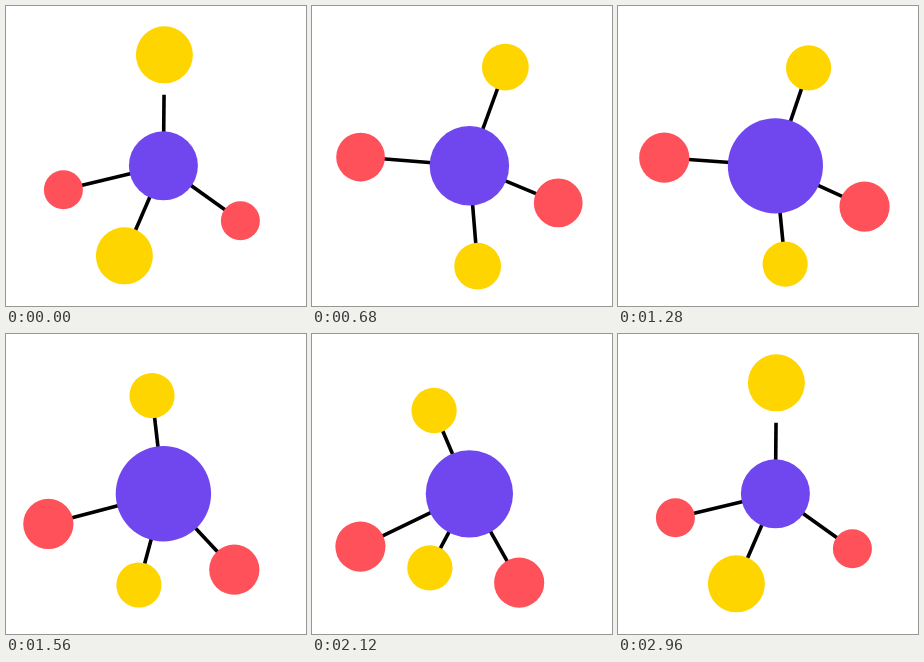
Animation, 300 px wide and 300 px high, one loop 3 s. Source, as an HTML page with a canvas:

```html
<!DOCTYPE html>
<html lang="en">
<head>
<meta charset="utf-8">
<title>Molecule</title>
<style>
  html, body { margin: 0; width: 100%; height: 100%; overflow: hidden; background: #fff; }
  canvas { display: block; }
</style>
</head>
<body>
<canvas width="300" height="300"></canvas>
<script>
const ctx = document.querySelector('canvas').getContext('2d');
const LOOP = 3000, STEP = 40, PHASE = 1000, PEAK = 1470;
const yellow = { color: '#ffd500', rest: 28.5, active: 22.6 };
const red = { color: '#ff5159', rest: 19.5, active: 25.1 };

// Atoms visit three stops around the core; bow bends the way between them outwards.
const atoms = [
  { ...yellow, bow: 1.7, gap: 40, stops: [[1, -111], [40.5, -95], [-35.5, -83]] },
  { ...yellow, bow: 2.5, gap: 0, stops: [[-39, 90], [16, 97], [-39.5, 74]] },
  { ...red, bow: 1.2, gap: 0, stops: [[-100, 24], [-109, -14], [-109, 53]] },
  { ...red, bow: 1.8, gap: 0, stops: [[77, 55], [90, 34], [49.5, 89]] }
];

const mix = (a, b, p) => a + (b - a) * p;
const ease = u => u < 0.5 ? 4 * u ** 3 : 1 - 4 * (1 - u) ** 3;

function travel({ stops, bow }, phase, p) {
  const [ax, ay] = stops[phase], [bx, by] = stops[(phase + 1) % 3];
  const dx = bx - ax, dy = by - ay;
  const side = Math.sign(dy * (ax + bx) - dx * (ay + by));
  const bend = side * bow * Math.hypot(dx, dy) / 200 * p * (1 - p);
  return [mix(ax, bx, p) + dy * bend, mix(ay, by, p) - dx * bend];
}

function disc(x, y, r, color) {
  ctx.fillStyle = color;
  ctx.beginPath();
  ctx.arc(x, y, r, 0, 2 * Math.PI);
  ctx.fill();
}

function draw(t) {
  const phase = Math.floor(t / PHASE);
  const p = ease(t % PHASE / PHASE);
  const away = [p, 1, 1 - p][phase];
  ctx.setTransform(1, 0, 0, 1, 0, 0);
  ctx.fillStyle = '#fff';
  ctx.fillRect(0, 0, 300, 300);
  ctx.translate(157.4, 159.8);
  ctx.lineWidth = 3.6;

  for (const atom of atoms) {
    const [x, y] = travel(atom, phase, p);
    const reach = 1 - atom.gap * (1 - away) / Math.hypot(x, y);
    ctx.beginPath();
    ctx.moveTo(0, 0);
    ctx.lineTo(x * reach, y * reach);
    ctx.stroke();
    disc(x, y, mix(atom.rest, atom.active, away), atom.color);
  }

  const swell = t < PEAK ? t / PEAK : (LOOP - t) / (LOOP - PEAK);
  disc(0, 0, mix(34.5, 47.7, ease(swell)), '#7047ee');
}

const start = performance.now();
function tick() {
  const t = (performance.now() - start) % LOOP;
  draw(Math.floor(t / STEP) * STEP);
  requestAnimationFrame(tick);
}
tick();
</script>
</body>
</html>
```
